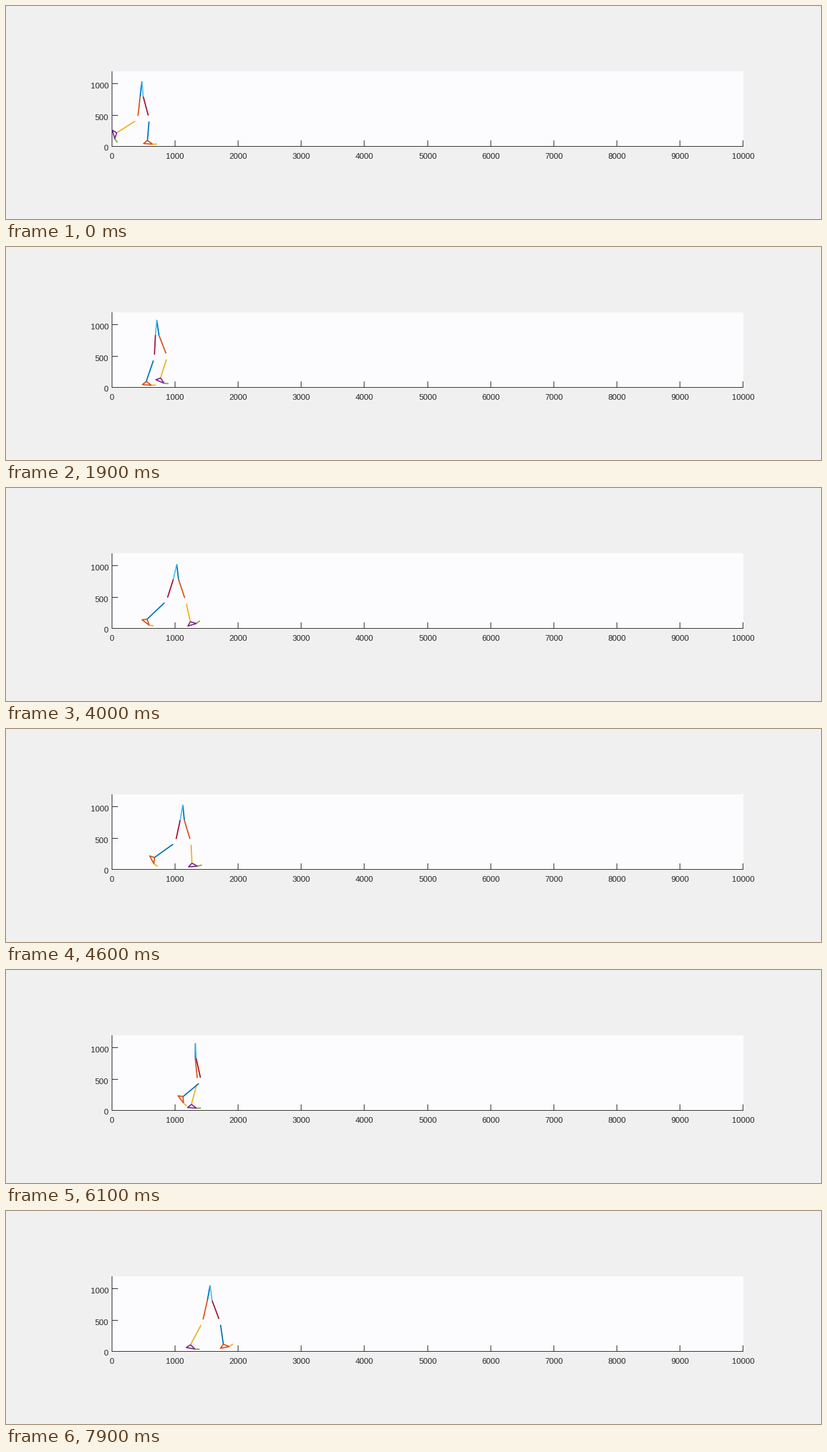
Write a matplotlib script that moves like this. It is 1280 by 336 pixels and loops after 8000 ms.

```python
import numpy as np
import matplotlib.pyplot as plt
from matplotlib.animation import FuncAnimation
from matplotlib.patches import Rectangle

W, H, DPI = 1280, 336, 100
FRAMES, INTERVAL = 80, 100
CYCLE, STRIDE = 100, 140     # frames and px of one full gait cycle
INK = "#262626"

BLUE, ORANGE, YELLOW, PURPLE = "#0072bd", "#d95319", "#edb120", "#7e2f8e"
GREEN, SKY, WINE = "#77ac30", "#4dbeee", "#a2142f"

THIGH, GAP, TOE = 54.8, 9.5, 7
HEEL, BALL = np.array([-5.7, 5.4]), np.array([8.4, 5.4])   # seen from the ankle

# Key poses of one leg: phase, ankle x, ankle y, thigh reach, foot angle, toe angle
GAIT = np.array([
    (0, 221.7, 212, 10, 4, -2),
    (11, 220.7, 212, 3, 4, -2),
    (28, 219.3, 211.3, -10.5, 9, 0),
    (40, 221, 207, -14.5, 37, 10),
    (51.5, 247.5, 199.5, -4.5, 77, 55),
    (61, 277.5, 199.7, 8, 53, 46),
    (68, 308.5, 206, 14, 27, 10),
    (78, 338.5, 210, 14, -9, -33),
    (90, 359, 211, 12.5, -17, -39),
])


def gait(phase):
    """Smooth periodic path through the key poses."""
    lap = np.array([CYCLE, STRIDE, 0, 0, 0, 0])
    keys = np.vstack([GAIT - lap, GAIT, GAIT + lap])
    t, p = keys[:, 0], keys[:, 1:]
    m = np.gradient(p, t, axis=0)
    i = np.searchsorted(t, phase, side="right") - 1
    d = t[i + 1] - t[i]
    u = (phase - t[i]) / d
    return ((1 + 2 * u) * (1 - u) ** 2 * p[i] + u * (1 - u) ** 2 * d * m[i]
            + u * u * (3 - 2 * u) * p[i + 1] + u * u * (u - 1) * d * m[i + 1])


def pelvis(i):
    w = 4 * np.pi / CYCLE    # sways and bobs once per step
    return np.array([211.1 + STRIDE / CYCLE * i + 1.9 * np.cos(w * i),
                     117.5 + 2.6 * np.cos(w * (i - 42))])


def unit(v):
    return v / np.hypot(*v)


def heading(deg):
    a = np.radians(deg)
    return np.array([np.cos(a), np.sin(a)])


def turn(v, deg):
    c, s = heading(deg)
    return np.array([c * v[0] - s * v[1], s * v[0] + c * v[1]])


def leg_parts(top, phase, dx):
    x, y, reach, foot, toe = gait(phase)
    ankle = np.array([x + dx, y])
    hip = top + (0.3 * reach - 1, 24)
    end = top + (reach, np.sqrt(THIGH ** 2 - reach ** 2))
    knee = end + GAP * unit(unit(end - hip) + unit(ankle - end))
    heel, ball = ankle + turn(HEEL, foot), ankle + turn(BALL, foot)
    return [(top, hip), (hip, end), (knee, ankle),
            (ankle, heel, ball, ankle), (ball, ball + TOE * heading(toe))]


fig = plt.figure(figsize=(W / DPI, H / DPI), dpi=DPI, facecolor="#f0f0f0")
ax = fig.add_axes([0, 0, 1, 1])
ax.set_xlim(0, W)
ax.set_ylim(H, 0)
ax.axis("off")


def px(n):
    return n * 72 / DPI


def rule(xs, ys):
    ax.plot(xs, ys, color=INK, lw=px(1), solid_capstyle="butt", snap=False, zorder=2)


def label(x, y, value, ha):
    ax.text(x, y, str(value), ha=ha, va="baseline", color=INK,
            family="Liberation Sans", size=px(12.8))


X0, X1, Y0, Y1 = 166.5, 1157.5, 221.5, 103
ax.add_patch(Rectangle((166, Y1), 992, 119, fc="#fcfcfe", ec="none", zorder=1))
rule([X0, X1 + 0.5], [Y0, Y0])
rule([X0, X0], [Y1, Y0 + 0.5])
for k in range(11):
    x = np.floor(X0 + (X1 - X0) * k / 10) + 0.5
    rule([x, x], [Y0, Y0 - 9.5])
    label(x, 241, 1000 * k, "center")
for k in range(3):
    y = np.floor(Y0 - 49.5 * k) + 0.5
    rule([X0, X0 + 9.5], [y, y])
    label(161, y + 7, 500 * k, "right")


def make_leg(*colors):
    return [ax.plot([], [], color=c, lw=px(1.9), solid_capstyle="butt",
                    solid_joinstyle="round", zorder=3)[0] for c in colors]


left = make_leg(BLUE, ORANGE, YELLOW, PURPLE, GREEN)
right = make_leg(SKY, WINE, BLUE, ORANGE, YELLOW)


def draw(i):
    top = pelvis(i)
    parts = leg_parts(top, i + CYCLE / 2, -STRIDE / 2) + leg_parts(top, i, 0)
    for line, pts in zip(left + right, parts):
        line.set_data(*(np.array(pts) + (0.5, 0)).T)
    return left + right


anim = FuncAnimation(fig, draw, frames=FRAMES, interval=INTERVAL,
                     init_func=lambda: draw(0), repeat=True, repeat_delay=0)
plt.show()
```
